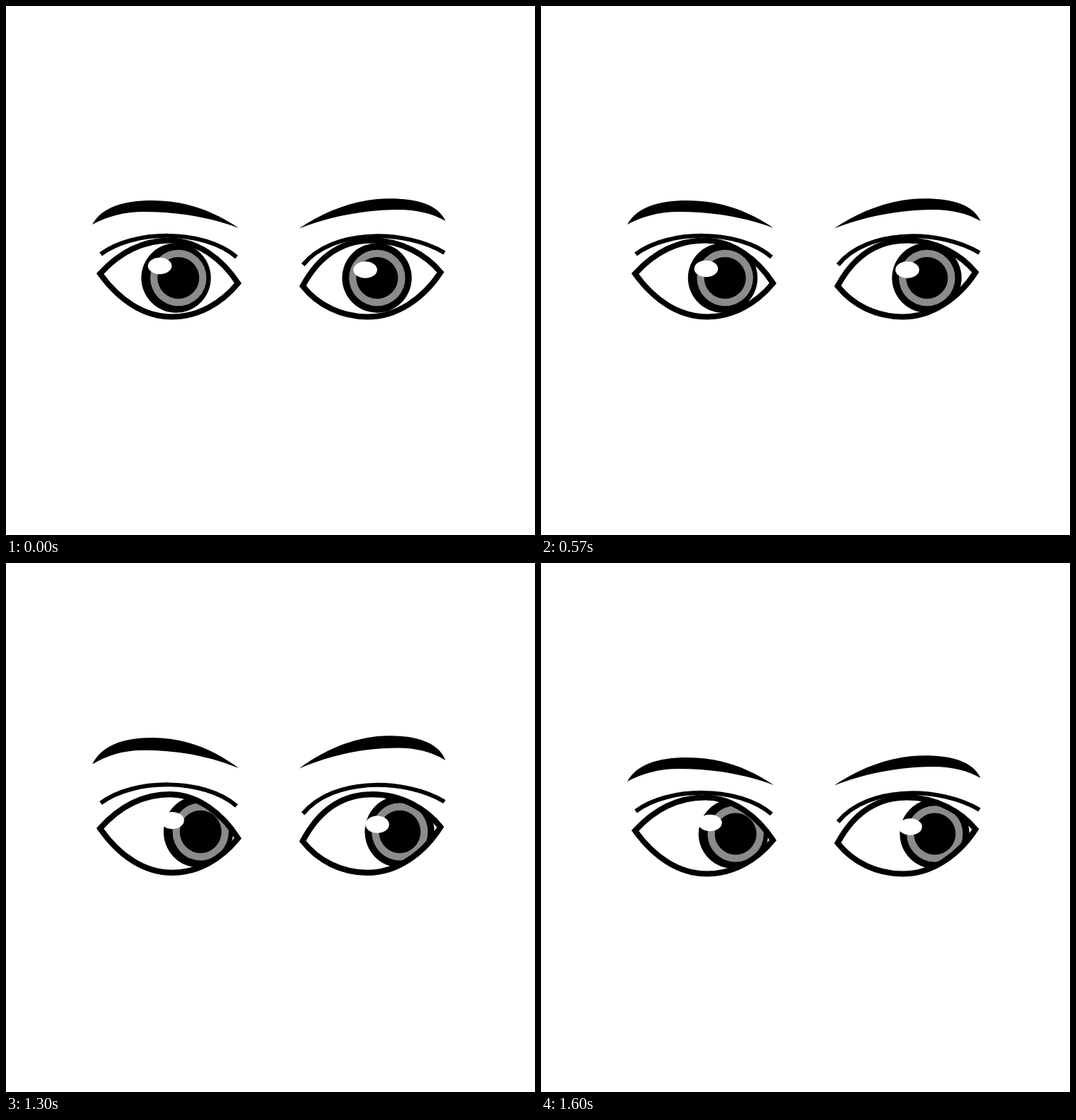
Write an HTML page that moves like this. It is 748 px wide and 748 px high and loops after 2.6 s.

```html
<!DOCTYPE html>
<html lang="en">
<head>
<meta charset="utf-8">
<title>Glancing eyes</title>
<style>
  html, body { margin: 0; height: 100%; overflow: hidden; background: #fff; }
  svg { display: block; width: 100%; height: 100%; }
  .line { fill: none; stroke: #000; }
</style>
</head>
<body>
<svg viewBox="0 0 748 748">
  <defs>
    <path id="shapeL" d="M133 378.5C158 351 190 331.5 232 331.5C271 331.5 306 358 328 392C305 420 272 439.5 235 439.5C195 439.5 160 416 133 378.5Z"/>
    <path id="shapeR" d="M419.5 396C441 356 472 331.5 518 331.5C560 331.5 594 352 614.5 376.5C590 414 552 439.5 512 439.5C474 439.5 441 423 419.5 396Z"/>
    <clipPath id="clipL"><use href="#shapeL"/></clipPath>
    <clipPath id="clipR"><use href="#shapeR"/></clipPath>
    <g id="pupil">
      <circle r="39.7" fill="#8b8b8b"/>
      <circle r="29.5"/>
    </g>
  </defs>
  <g id="brows">
    <path d="M122 309C135 285 165 275 207 275C254 275 293 290 329 314C284 297.5 240 291 195 291C165 291 143 298 122 309Z"/>
    <path d="M414.5 314.5C452 289 497 272.3 542 272.3C582 272.3 611 281 621.5 304C602 293 580 288 555 288C507 288 460 297 414.5 314.5Z"/>
  </g>
  <g id="creases" class="line" stroke-width="6">
    <path d="M134 351C180 316 280 315 326 355"/>
    <path d="M420 366C462 314 565 316 620 349"/>
  </g>
  <g id="eyes">
    <g clip-path="url(#clipL)">
      <g id="irisL"><circle r="49.2"/><use href="#pupil" x="3.2"/></g>
      <ellipse id="glintL" rx="16.8" ry="11.8" fill="#fff"/>
    </g>
    <g clip-path="url(#clipR)">
      <g id="irisR"><circle r="49.2"/><use href="#pupil" x="0.3"/></g>
      <ellipse id="glintR" rx="16.8" ry="11.8" fill="#fff"/>
    </g>
    <g class="line" stroke-width="8">
      <use href="#shapeL"/>
      <use href="#shapeR"/>
    </g>
  </g>
</svg>
<script>
const LOOP = 2600;
const keySteps = [0, 3, 5, 6, 9];
const track = {
  irisL:   [240.5, 250, 257, 261, 272],
  irisR:   [524.5, 533.5, 545.5, 549.5, 556.5],
  irisY:   [384.5, 384, 384.5, 384, 383],
  glintL:  [217.5, 217.5, 233.5, 235, 239],
  glintLY: [367.5, 367.5, 371.5, 371, 367.5],
  glintR:  [508, 508, 518, 519, 522]
};

function at(values, step) {
  let i = 0;
  while (i < keySteps.length - 2 && step > keySteps[i + 1]) i++;
  const f = (step - keySteps[i]) / (keySteps[i + 1] - keySteps[i]);
  return values[i] + (values[i + 1] - values[i]) * f;
}

const transform = (id, value) =>
  document.getElementById(id).setAttribute('transform', value);
const place = (id, x, y) => transform(id, `translate(${x} ${y})`);

function draw(now) {
  const t = now % LOOP;
  // The gaze advances in nine jumps, 100 ms apart
  const step = Math.max(0, Math.min(9, Math.floor((t - 70) / 100)));
  const raised = (t >= 1300 && t < 1400) || (t >= 1500 && t < 1600);
  const pos = name => at(track[name], step);

  place('irisL', pos('irisL'), pos('irisY'));
  place('irisR', pos('irisR'), pos('irisY'));
  place('glintL', pos('glintL') - (raised ? 4 : 0), pos('glintLY'));
  place('glintR', pos('glintR') + (raised ? 3 : 0), 373);

  transform('brows', raised ? 'matrix(1 0 0 1.1 0 -55.4)' : '');
  transform('creases', raised ? 'translate(0 -11.5)' : '');
  transform('eyes', raised ? 'matrix(1 0 0 1.026 0 -13)' : '');
}

const start = performance.now();
function tick() {
  draw(performance.now() - start);
  requestAnimationFrame(tick);
}
tick();
</script>
</body>
</html>
```
